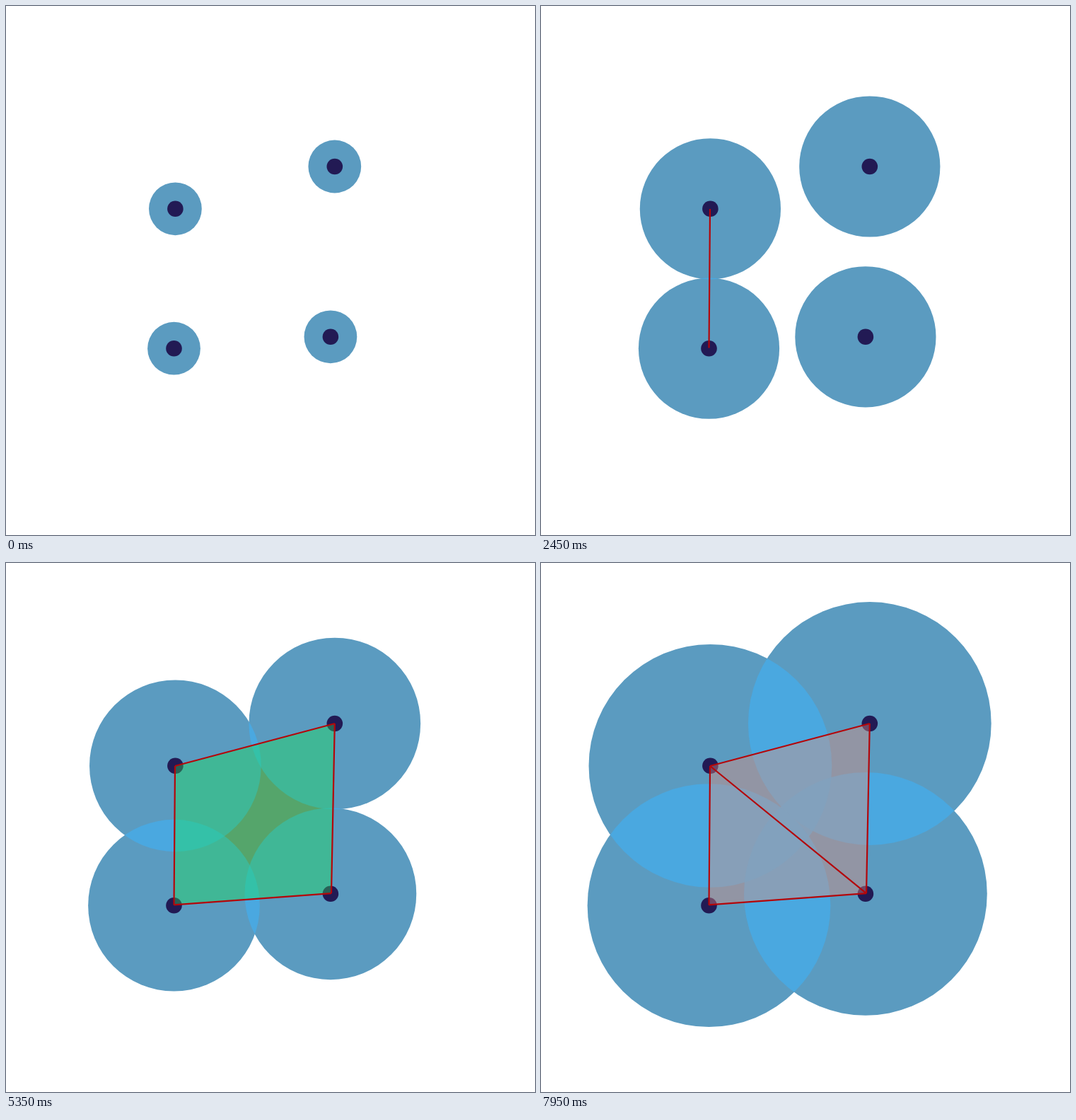
An HTML page with a canvas that plays this animation: 748 by 748 pixels, repeating every 8 s.

```html
<!DOCTYPE html>
<html lang="en">
<head>
<meta charset="utf-8">
<title>Growing discs</title>
<style>
  html, body { margin: 0; width: 100%; height: 100%; overflow: hidden; background: #fff; }
  canvas { display: block; width: 748px; height: 748px; }
</style>
</head>
<body>
<canvas id="stage" width="748" height="748"></canvas>
<script>
const SIZE = 748, LOOP = 8000, STEP = 50, DOT_RADIUS = 11.3;
const ctx = document.getElementById('stage').getContext('2d');

// Each vertex has a disc center and the point where its edges meet.
const A = { center: [239.4, 286.8], joint: [239, 287] };
const B = { center: [464.8, 227], joint: [464.8, 227] };
const C = { center: [237.5, 484.2], joint: [237.5, 483.4] };
const D = { center: [458.9, 467.8], joint: [460, 467.2] };
const vertices = [A, B, C, D];
const quad = [A, B, D, C];

const distance = (p, q) =>
  Math.hypot(p.center[0] - q.center[0], p.center[1] - q.center[1]);

// Radius at which two discs touch.
const touch = (p, q) => distance(p, q) / 2;

// Radius at which three discs meet: the circumradius, from Heron's formula.
function meet(p, q, s) {
  const a = distance(p, q), b = distance(q, s), c = distance(s, p);
  const h = (a + b + c) / 2;
  return a * b * c / (4 * Math.sqrt(h * (h - a) * (h - b) * (h - c)));
}

const edges = [[A, C], [C, D], [A, B], [B, D], [A, D]];
const holeBorn = touch(B, D), lowerFilled = meet(A, C, D), upperFilled = meet(A, B, D);

// Colours by the number of discs covering a point: 0, 1, 2, 3.
const plain = { cover: ['#fff', '#5b9bc0', '#4aa8e0', '#43ade8'], dot: '#221a54' };
const hole = { cover: ['#55a56b', '#40b796', '#34c1a8', '#2fc5b0'], dot: '#296156' };
const filled = { cover: ['#a58585', '#9295a4', '#879fb8', '#82a1bd'], dot: '#6f4766' };

// The growth eases to a rest just past each event.
const PAST = 0.9;
const rests = [
  [-1100, 22.6], [2400, touch(A, C)], [3500, touch(C, D)], [4750, touch(A, B)],
  [5300, holeBorn], [6200, touch(A, D)], [7000, upperFilled], [8120, touch(B, C)]
];
const smooth = u => u * u * u * (10 - 15 * u + 6 * u * u);

function radiusAt(time) {
  const next = rests.findIndex(([t]) => t > time);
  const [t0, r0] = rests[next - 1], [t1, r1] = rests[next];
  return PAST + r0 + (r1 - r0) * smooth((time - t0) / (t1 - t0));
}

function tracePath(points) {
  ctx.beginPath();
  points.forEach(p => ctx.lineTo(...p.joint));
  ctx.closePath();
}

function traceDisc(vertex, radius) {
  ctx.beginPath();
  ctx.arc(...vertex.center, radius, 0, 2 * Math.PI);
}

// Fills every region shared by `depth` discs with the current colour.
function fillShared(depth, radius, first = 0) {
  for (let i = first; i <= vertices.length - depth; i++) {
    traceDisc(vertices[i], radius);
    if (depth === 1) {
      ctx.fill();
      continue;
    }
    ctx.save();
    ctx.clip();
    fillShared(depth - 1, radius, i + 1);
    ctx.restore();
  }
}

function paintDiscs(style, radius) {
  style.cover.forEach((color, depth) => {
    ctx.fillStyle = color;
    if (depth === 0) ctx.fillRect(0, 0, SIZE, SIZE);
    else fillShared(depth, radius);
  });
  ctx.fillStyle = style.dot;
  for (const vertex of vertices) {
    traceDisc(vertex, DOT_RADIUS);
    ctx.fill();
  }
}

function paintFace(points, style, radius) {
  ctx.save();
  tracePath(points);
  ctx.clip();
  paintDiscs(style, radius);
  ctx.restore();
}

function draw(time) {
  const radius = radiusAt(time);
  paintDiscs(plain, radius);

  if (radius >= holeBorn) paintFace(quad, radius >= upperFilled ? filled : hole, radius);
  if (radius >= lowerFilled && radius < upperFilled) paintFace([A, D, C], filled, radius);

  ctx.strokeStyle = '#b4060a';
  ctx.lineWidth = 2.2;
  for (const edge of edges) {
    if (radius < touch(...edge)) continue;
    tracePath(edge);
    ctx.stroke();
  }
}

const start = performance.now();
function tick() {
  const time = (performance.now() - start) % LOOP;
  draw(Math.floor(time / STEP) * STEP);
  requestAnimationFrame(tick);
}
tick();
</script>
</body>
</html>
```
